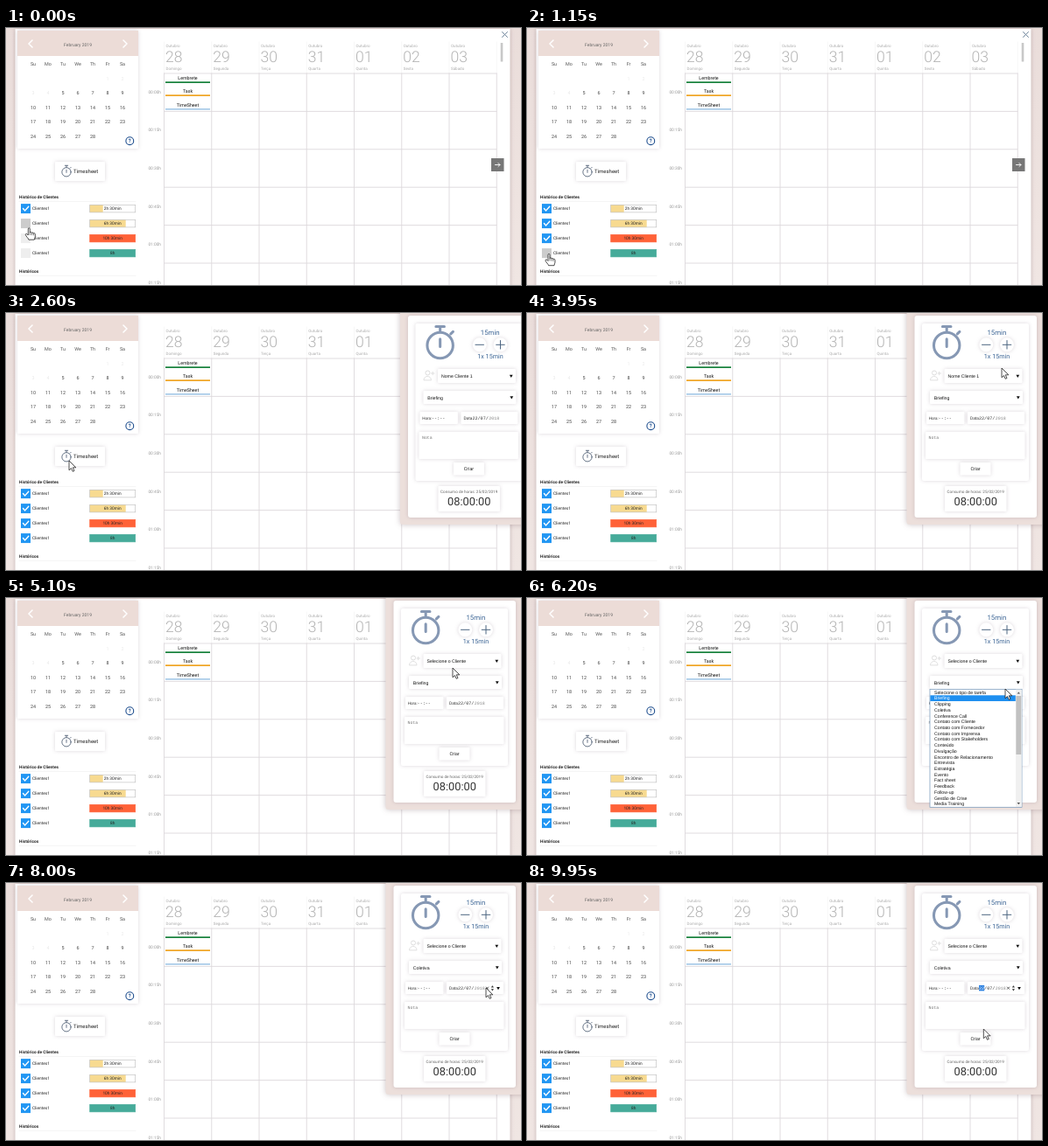
An HTML page for the animation above (10000 ms loop, 588 by 294 pixels).

```html
<!DOCTYPE html>
<html lang="pt">
<head>
<meta charset="utf-8">
<title>Timesheet</title>
<style>
html, body { margin: 0; width: 100%; height: 100%; overflow: hidden; background: #ecdfdc; }
svg { display: block; width: 100vw; height: 100vh; }
text { font-family: Roboto, Arial, sans-serif; fill: #333; text-rendering: geometricPrecision; white-space: pre; }
.mono { font-family: "Liberation Mono", "DejaVu Sans Mono", monospace; }
.ui { font-family: "Liberation Sans", Arial, sans-serif; fill: #111; }
.soft { fill: #fff; filter: drop-shadow(0 0 2px rgba(90, 70, 90, .22)); }
.line { fill: none; stroke-linecap: round; stroke-linejoin: round; }
</style>
</head>
<body>
<svg id="stage" viewBox="0 0 588 294" preserveAspectRatio="none" xmlns="http://www.w3.org/2000/svg">
  <defs>
    <linearGradient id="wall" x2="0" y2="1">
      <stop offset="0" stop-color="#eaddda"/><stop offset="1" stop-color="#f0e6e3"/>
    </linearGradient>
    <g id="watch" class="line">
      <circle r="9.2"/>
      <path d="M-3-13.4H3M0-13V-9.6M7.6-8.2L9.2-9.8M0-4.5V1"/>
    </g>
    <path id="tri" d="M-1.9-1.4H1.9L0 1.9Z" fill="#111"/>
  </defs>
  <g id="page"></g>
  <g id="panel"></g>
  <g id="list"></g>
  <g id="arrow"><path d="M0 0V10.8L2.5 8.5L4.2 12.3L6 11.5L4.3 7.8H7.8Z" fill="#fff" stroke="#222" stroke-width=".8"/></g>
  <g id="hand"><path d="M-1 .9C-1-.5 1-.5 1 .9V5C1.4 4.2 3 4.2 3.1 5.4C3.6 4.7 5 4.9 5.1 6C5.7 5.4 7 5.7 7 6.9V9.6C7 11 6 11.6 6 13.2H-.4C-.7 11.6-3.2 9.6-4 7.6C-4.2 6.4-2.8 6-2 6.9L-1 8Z" fill="#fff" stroke="#222" stroke-width=".8"/><path class="line" d="M1 5V7.5M3.1 5.5V7.7M5.1 6.2V7.9" stroke="#222" stroke-width=".6"/></g>
</svg>
<script>
const LOOP = 10000;
const $ = id => document.getElementById(id);

const text = (x, y, s, size, o = {}) =>
  `<text x="${x}" y="${y}" dy=".35em" font-size="${size}" text-anchor="${o.at || 'start'}" class="${o.cls || ''}"` +
  ` style="${o.fill ? `fill:${o.fill};` : ''}font-weight:${o.w || 400}"${o.id ? ` id="${o.id}"` : ''}>${s}</text>`;
const mid = (x, y, s, size, o = {}) => text(x, y, s, size, { ...o, at: 'middle' });
const rect = (x, y, w, h, fill, extra = '') =>
  `<rect x="${x}" y="${y}" width="${w}" height="${h}" fill="${fill}" ${extra}/>`;
const card = (x, y, w, h, r = 1) => `<rect class="soft" x="${x}" y="${y}" width="${w}" height="${h}" rx="${r}"/>`;
const path = (d, stroke, w = 1) => `<path class="line" d="${d}" stroke="${stroke}" stroke-width="${w}"/>`;
const watch = (x, y, k, color, w) =>
  `<use href="#watch" transform="translate(${x} ${y}) scale(${k})" stroke="${color}" stroke-width="${w}"/>`;
const tri = (x, y) => `<use href="#tri" x="${x}" y="${y}"/>`;

function monthView() {
  let s = card(13, 3, 138, 135) + rect(13, 3, 138, 29, '#ecdcd7');
  s += path('M30 14L26 18L30 22M134 14L138 18L134 22', '#fff', 1.5);
  s += mid(82, 19, 'February 2019', 5, { fill: '#666' });
  const x = i => 31 + 17 * i;
  ['Su', 'Mo', 'Tu', 'We', 'Th', 'Fr', 'Sa'].forEach((d, i) => s += mid(x(i), 41, d, 5.4, { fill: '#555' }));
  for (let d = 1; d <= 28; d++) {
    const cell = d + 4;
    s += mid(x(cell % 7), 58 + 16.5 * Math.floor(cell / 7), d, 5.4, { fill: d < 5 ? '#e9e9e9' : '#444' });
  }
  s += '<circle cx="141.3" cy="129.2" r="4.4" fill="#fff" stroke="#1f4f8f" stroke-width="1.1"/>';
  return s + mid(141.3, 129.3, '?', 6, { fill: '#1f4f8f', w: 700 });
}

function clients() {
  let s = card(56, 153, 57, 22) + watch(69, 164.8, .56, '#4a5a70', 1.5);
  s += text(77, 164.3, 'Timesheet', 6, { fill: '#222' });
  s += text(15, 193, 'Histórico de Clientes', 4.8, { w: 700, fill: '#222' }) + path('M15 198.5H148', '#eee', .6);
  s += text(15, 278, 'Históricos', 4.8, { w: 700, fill: '#222' }) + path('M15 283.5H148', '#eee', .6);
  const bars = [['2h 30min', 15, '#f7da90'], ['6h 30min', 41, '#f7da90'], ['10h 30min', 52, '#ff6238'], ['8h', 52, '#46ab9a']];
  bars.forEach(([label, w, color], i) => {
    const y = 206.6 + 17 * i;
    s += rect(17, y - 5.5, 11, 11, '#eee', `id="box${i}"`);
    s += `<g id="tick${i}">${path(`M19.5 ${y}L21.7 ${y + 2.3}L25.8 ${y - 2.3}`, '#fff', 1.4)}</g>`;
    s += text(30, y, 'Clientes1', 4.8, { fill: '#222' });
    s += rect(95.7, y - 4.3, 52, 8.6, '#fff') + rect(95.7, y - 4.3, w, 8.6, color);
    s += rect(95.7, y - 4.3, 52, 8.6, 'none', `stroke="${i < 2 ? '#bbb' : color}" stroke-width=".6"`);
    s += mid(121.7, y, label, 4.8, { fill: '#222' });
  });
  return s;
}

function weekView() {
  let s = '';
  const col = i => 180.5 + 54.25 * i, row = i => 52 + 43.4 * i;
  for (let i = 0; i < 8; i++) {
    s += path(`M${col(i)} 16V52`, '#f1f1f1', .6) + path(`M${col(i)} 52V294`, '#ddd9dc', .9);
  }
  for (let i = 0; i < 6; i++) {
    s += path(`M180.5 ${row(i)}H560`, '#ddd9dc', .9);
    const min = i * 15, two = n => String(n).padStart(2, '0');
    s += text(177, 73 + 43.7 * i, `${two(Math.floor(min / 60))}:${two(min % 60)}h`, 4.8, { at: 'end', fill: '#999' });
  }
  const names = ['Domingo', 'Segunda', 'Terça', 'Quarta', 'Quinta', 'Sexta', 'Sábado'];
  ['28', '29', '30', '31', '01', '02', '03'].forEach((n, i) => {
    const x = col(i) + 2;
    s += text(x, 20.5, 'Outubro', 4.5, { fill: '#aaa' });
    s += text(x - .5, 33.3, n, 17.6, { w: 300, fill: '#b4b4b4' });
    s += text(x, 46, names[i], 4.5, { fill: '#aaa' });
  });
  [['Lembrete', 57.3, '#15803a'], ['Task', 72.3, '#f0a422'], ['TimeSheet', 88, '#a8cbe8']].forEach(([label, y, color]) => {
    s += rect(182, y - 4.5, 51, 9, '#fff') + mid(207.5, y, label, 5.3, { fill: '#111' }) + rect(182, y + 4, 51, 1.7, color);
  });
  s += rect(564.7, 17, 2.6, 21.5, '#c8c8c8') + path('M566.5 4.5L572.5 10.5M572.5 4.5L566.5 10.5', '#5f7890', .9);
  s += rect(554, 149, 14.5, 15, '#777') + path('M558.5 156.5H564M562 154.5L564 156.5L562 158.5', '#fff', .9);
  return s;
}

function formPanel() {
  const blue = '#3c6595';
  let s = rect(433.5, -4, 170, 246, '#ecdfdb', 'rx="3" style="filter:drop-shadow(0 0 3px rgba(80,50,60,.3))"');
  s += card(442.5, 3, 139.5, 231, 3) + card(451, 12, 122, 180, 2);
  s += watch(479.2, 37, 1.6, '#8698b4', 1.9);
  s += mid(536.3, 22, '15min', 7.8, { fill: blue }) + mid(536.5, 49.5, '1x 15min', 7.2, { fill: blue });
  for (const x of [524.3, 548]) s += `<circle class="soft" cx="${x}" cy="36.3" r="8"/>`;
  s += path('M519.5 36.3H529M543.2 36.3H552.8M548 31.5V41.1', '#4b6480', 1);
  s += '<circle cx="465" cy="68.5" r="2.5" fill="none" stroke="#ddd"/>' + path('M460.5 76.5C460.5 71 469 71 469 76.5ZM469 69H472.5M470.7 67.3V70.8', '#ddd', .9);
  s += card(476.5, 64, 89, 16) + text(480.5, 72.2, '', 5.2, { cls: 'ui', id: 'client' }) + tri(560.3, 72.2);
  s += card(460, 89, 106, 15) + text(464.8, 96.7, '', 5.2, { cls: 'ui', id: 'task' }) + tri(560.8, 96.7);
  s += card(456, 113, 43.5, 14) + text(458.7, 120.3, 'Hora:', 4.6) + text(469.6, 120.3, '--:--', 5.1, { cls: 'mono' });
  s += card(503, 113, 65, 14) + text(506, 120.3, 'Data', 4.8);
  s += rect(516, 117, 6.2, 6.4, '#2a7fe0', 'id="sel"');
  s += text(516, 120.3, '22', 5.1, { cls: 'mono', id: 'day' }) + text(522.1, 120.3, '/07/', 5.1, { cls: 'mono' });
  s += text(534.8, 120.3, '2018', 5, { cls: 'mono', fill: '#888' });
  s += `<g id="tools">${path('M548.3 119L550.7 121.4M550.7 119L548.3 121.4', '#333', .8)}`;
  s += `<path d="M553.8 119.4H557L555.4 117.2ZM553.8 121.2H557L555.4 123.4Z" fill="#333"/>${tri(562, 120.3)}</g>`;
  s += card(455, 136, 113.5, 31) + text(458.5, 142.3, 'Nota', 4.9, { cls: 'mono', fill: '#777' });
  s += card(494.5, 171, 35, 14.5) + mid(512, 178.3, 'Criar', 5.3, { fill: '#222' });
  s += card(477, 198, 70.5, 29) + mid(512.2, 204.3, 'Consumo de horas: 25/02/2019', 4.6, { fill: '#666' });
  return s + mid(512.3, 216, '08:00:00', 12.8, { fill: '#333' });
}

const TASKS = ['Selecione o tipo de tarefa', 'Briefing', 'Clipping', 'Coletiva', 'Conference Call', 'Contato com Cliente',
  'Contato com Fornecedor', 'Contato com Imprensa', 'Contato com Stakeholders', 'Conteúdo', 'Divulgação',
  'Encontro de Relacionamento', 'Entrevista', 'Estratégia', 'Evento', 'Fact sheet', 'Feedback', 'Follow-up',
  'Gestão de Crise', 'Media Training'];
const ROW = 6.71, LIST_Y = 104.6;

function taskList() {
  let s = rect(460, 104.3, 105, 135, '#fff', 'stroke="#6f94b8" stroke-width=".7"');
  s += rect(460.4, 0, 97.4, ROW, '#1e8ff0', 'id="mark"');
  TASKS.forEach((t, i) => s += text(465, LIST_Y + ROW * (i + .5), t, 5.2, { cls: 'ui', id: 'opt' + i }));
  s += rect(558, 104.7, 6.6, 134.2, '#f0f0f0') + rect(558.4, 112, 5.8, 67, '#c1c1c1');
  return s + '<path d="M559.6 109.6H563L561.3 107.4ZM559.6 234H563L561.3 236.2Z" fill="#555"/>';
}

$('page').innerHTML = rect(0, 0, 588, 294, 'url(#wall)') +
  rect(10.5, 1, 565, 300, '#fff', 'style="filter:drop-shadow(0 0 2px rgba(80,50,60,.3))"') +
  monthView() + clients() + weekView();
$('panel').innerHTML = formPanel();
$('list').innerHTML = taskList();

// Pointer stops: time, x, y
const STOPS = [[0, 26.3, 229], [50, 26.3, 229], [220, 24, 225], [380, 24, 225], [580, 24, 242], [740, 24, 242], [1020, 25, 258.5],
  [1420, 25, 258.5], [2050, 72, 169], [2700, 72, 169], [3450, 538, 58], [3900, 542, 63], [4000, 542, 63], [4300, 545, 72],
  [4700, 545, 72], [5000, 510, 80], [5150, 510, 80], [5600, 546, 98], [5800, 546, 98], [6100, 546, 104], [6300, 546, 104],
  [6950, 490, 128], [7250, 490, 128], [7900, 548, 120], [8500, 548, 120], [8900, 519, 120], [9250, 519, 120], [9850, 521.3, 167], [LOOP, 521.3, 167]];
const TICKS = [-1, 300, 660, 1300];

const smooth = p => p * p * (3 - 2 * p);
const show = (id, on) => $(id).setAttribute('visibility', on ? 'visible' : 'hidden');

function pointer(t) {
  const i = Math.max(1, STOPS.findIndex(s => s[0] > t));
  const [t0, x0, y0] = STOPS[i - 1], [t1, x1, y1] = STOPS[i];
  const p = smooth((t - t0) / (t1 - t0));
  return [x0 + (x1 - x0) * p, y0 + (y1 - y0) * p];
}

function draw(t) {
  const [x, y] = pointer(t);
  const hand = t < 1500;
  show('hand', hand);
  show('arrow', !hand);
  $(hand ? 'hand' : 'arrow').setAttribute('transform', `translate(${x} ${y})`);

  TICKS.forEach((at, i) => {
    const on = t >= at, top = 201.1 + 17 * i;
    const over = x > 17 && x < 28 && y > top && y < top + 11;
    show('tick' + i, on);
    $('box' + i).setAttribute('fill', on ? '#2196f3' : over ? '#ccc' : '#eee');
  });

  const p = Math.min(1, Math.max(0, (t - 2415) / 350));
  $('panel').setAttribute('transform', `translate(${160 * (1 - p) ** 3} 0)`);
  show('panel', p > 0);

  $('client').textContent = t < 5100 ? 'Nome Cliente 1' : 'Selecione o Cliente';
  $('task').textContent = TASKS[t < 7200 ? 1 : 3];

  const open = t >= 5700 && t < 7200;
  const row = y < 105 ? 1 : Math.floor((y - LIST_Y) / ROW);
  show('list', open);
  show('mark', open);
  $('mark').setAttribute('y', LIST_Y + ROW * row);
  TASKS.forEach((_, i) => $('opt' + i).style.fill = i === row ? '#fff' : '#111');

  const focus = t >= 8950;
  show('tools', t >= 7800);
  show('sel', focus);
  $('day').style.fill = focus ? '#fff' : '#333';
}

function tick(now) {
  draw(now % LOOP);
  requestAnimationFrame(tick);
}
draw(0);
requestAnimationFrame(tick);
</script>
</body>
</html>
```
